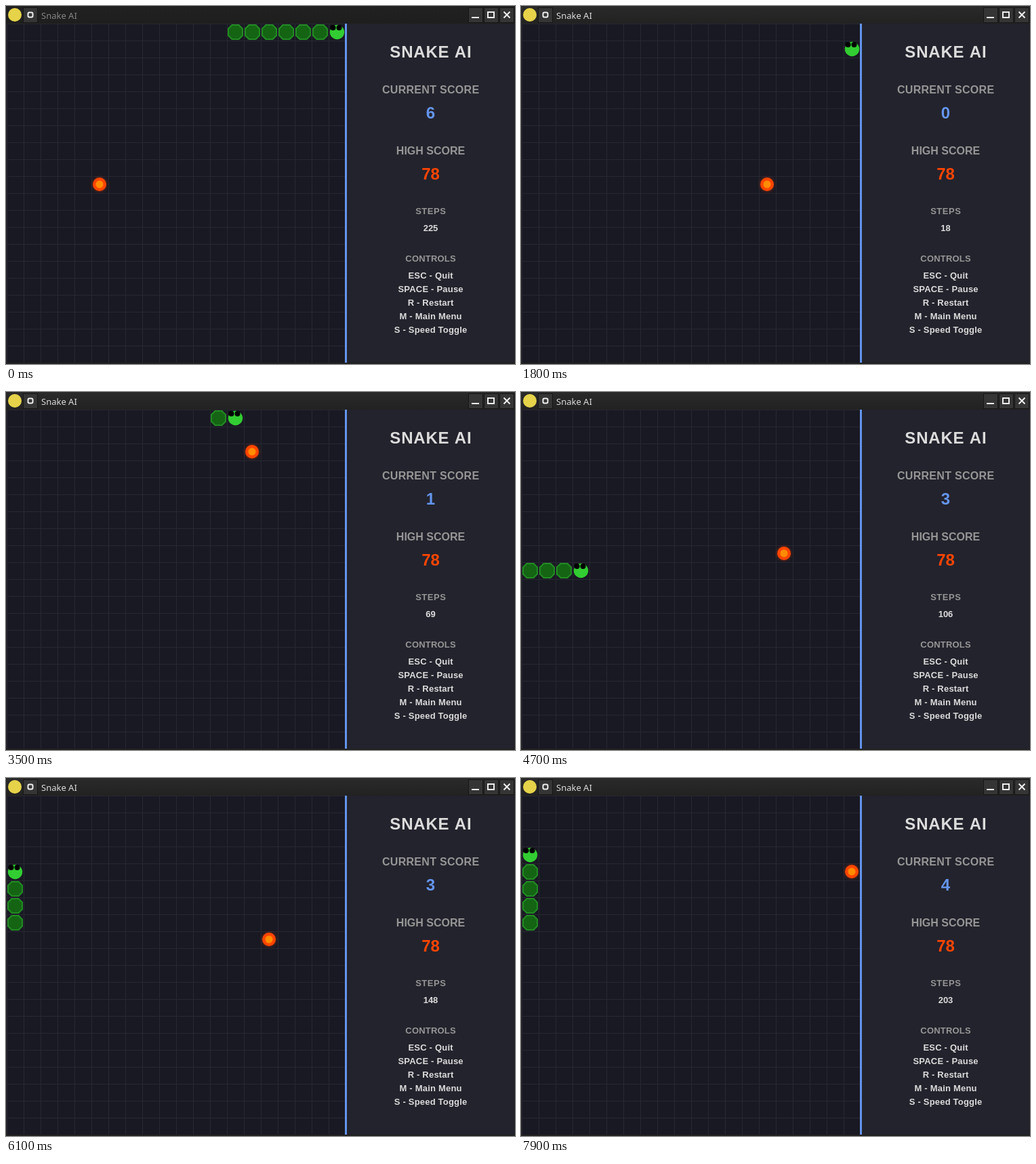
An HTML page with a canvas for the animation above (8 s loop, 751 by 528 pixels).

```html
<!DOCTYPE html>
<html>
<head>
<meta charset="utf-8">
<title>Snake AI</title>
<style>
html, body { margin: 0; width: 100%; height: 100%; overflow: hidden; background: #191923; }
canvas { display: block; }
</style>
</head>
<body>
<canvas id="stage" width="751" height="528"></canvas>
<script>
const g = document.getElementById('stage').getContext('2d');
const CELL = 25, LEFT = 1, TOP = 26, LAST = 19;
const LIGHT = '#dcdcdc', GREY = '#969696', BLUE = '#6495ed', ORANGE = '#ff4500';

// The snake circles clockwise: right along the top row, down the right wall,
// back left along another row, where it may change rows once at column `turn`.
// Returns the state of the game after every step.
function play(x, y, score, foods, laps) {
  const trail = [], states = [];
  let eaten = 0;
  function visit() {
    trail.push([x, y]);
    const [fx, fy] = foods[eaten];
    if (x === fx && y === fy) {
      score++;
      eaten++;
    }
    states.push({ score, food: foods[eaten], snake: trail.slice(-score - 1) });
  }
  function toColumn(end) {
    while (x !== end) { x += Math.sign(end - x); visit(); }
  }
  function toRow(end) {
    while (y !== end) { y += Math.sign(end - y); visit(); }
  }
  visit();
  for (const { top = 0, row, turn = 0, exit = row } of laps) {
    toRow(top);
    toColumn(LAST);
    toRow(row);
    toColumn(turn);
    toRow(exit);
    toColumn(0);
  }
  toRow(0);
  return states;
}

const oldGame = play(13, 0, 6, [[5, 9], [12, 5]], [{ row: 9 }]);
const newGame = play(10, 10, 0, [[14, 9], [14, 2], [3, 9], [15, 8], [19, 4]], [
  { top: 1, row: 10, turn: 14, exit: 9 },
  { row: 2, turn: 10, exit: 8 },
  { top: 9, row: 10 },
  { row: 8 }
]);

function rect(color, x, y, w, h) {
  g.fillStyle = color;
  g.fillRect(x, y, w, h);
}

function disc(color, x, y, r) {
  g.fillStyle = color;
  g.beginPath();
  g.arc(x, y, r, 0, 2 * Math.PI);
  g.fill();
}

// Square with its corners cut off; r is half the width.
function octagon(color, x, y, r, cut) {
  g.fillStyle = color;
  g.beginPath();
  for (let i = 0; i < 8; i++) {
    const a = (i + 0.5) * Math.PI / 4;
    const side = v => Math.sign(v) * (Math.abs(v) > 0.5 ? r : r - cut);
    g.lineTo(x + side(Math.cos(a)), y + side(Math.sin(a)));
  }
  g.fill();
}

function label(text, y, size, color, spacing = 0) {
  g.font = `bold ${size}px "Liberation Sans", Arial, sans-serif`;
  g.letterSpacing = spacing + 'px';
  g.textAlign = 'center';
  g.fillStyle = color;
  g.fillText(text, 626.5 + spacing / 2, y);
  g.letterSpacing = '0px';
}

function button(x) {
  rect('#161616', x - 1, 2, 22, 23);
  rect('#353535', x, 3, 20, 21);
}

function titleBar(active) {
  const shade = g.createLinearGradient(0, 0, 0, TOP);
  shade.addColorStop(0, active ? '#2a2a2a' : '#212121');
  shade.addColorStop(1, active ? '#222' : '#1e1e1e');
  rect(shade, 0, 0, 751, TOP);
  disc('#e6d34a', 13, 13, 10);
  [26, 683, 706, 729].forEach(button);

  g.strokeStyle = '#eee';
  g.lineWidth = 2;
  g.beginPath();
  g.roundRect(32.5, 9.5, 7, 7, 2);
  g.stroke();
  rect('#eee', 687, 16, 11, 2);
  g.strokeRect(711, 9, 9, 8);
  g.beginPath();
  g.moveTo(734.5, 8.5); g.lineTo(743.5, 17.5);
  g.moveTo(743.5, 8.5); g.lineTo(734.5, 17.5);
  g.stroke();

  g.font = '13px "Noto Sans", sans-serif';
  g.textAlign = 'left';
  g.fillStyle = active ? LIGHT : '#858585';
  g.fillText('Snake AI', 52, 19);
}

function board() {
  rect('#191923', LEFT, TOP, 500, 500);
  for (let i = 0; i < 500; i += CELL) {
    rect('#282832', LEFT + i, TOP, 1, 500);
    rect('#282832', LEFT, TOP + i, 500, 1);
  }
}

const center = ([x, y]) => [LEFT + (x + 0.5) * CELL, TOP + (y + 0.5) * CELL];

function drawFood(cell) {
  const [x, y] = center(cell).map(Math.floor);
  disc('rgba(255,69,0,.06)', x, y, 13);
  disc('rgba(255,69,0,.1)', x, y, 11.5);
  disc(ORANGE, x, y, 10);
  disc('#ff8c00', x, y, 5.5);
}

function drawSnake(cells) {
  const [head, ...body] = cells.map(center).reverse();
  for (const [x, y] of body) {
    octagon('#228b22', x, y, 11.5, 6);
    octagon('#146414', x, y, 9.5, 5);
  }
  const [x, y] = head;
  disc('#32cd32', x, y, 10.7);
  disc('#000', x - 6, y - 6.5, 4);
  disc('#000', x + 3, y - 6.5, 4);
}

function panel(score, steps) {
  rect('#23232d', 501, TOP, 249, 500);
  rect(BLUE, 500, TOP, 3, 500);
  label('SNAKE AI', 76, 24, LIGHT, 0.8);
  label('CURRENT SCORE', 129, 16, GREY, 0.3);
  label(score, 166, 24, BLUE);
  label('HIGH SCORE', 219, 16, GREY);
  label('78', 256, 24, ORANGE);
  label('STEPS', 307, 13, GREY, 0.5);
  label(steps, 332, 13, LIGHT);
  label('CONTROLS', 377, 13, GREY, 0.2);
  ['ESC - Quit', 'SPACE - Pause', 'R - Restart', 'M - Main Menu', 'S - Speed Toggle']
    .forEach((text, i) => label(text, 402 + 20 * i, 13, LIGHT, 0.2));
}

const start = performance.now();

function draw() {
  const t = Math.floor((performance.now() - start) % 8000 / 100) * 100;
  const restarted = t >= 1200;
  const steps = Math.floor(restarted ? 0.02 + (t - 1200) * 0.0303 : 225 + t * 0.0303);
  const { score, food, snake } = restarted ? newGame[steps] : oldGame[steps - 219];

  rect('#212121', 0, 0, 751, 528);
  board();
  drawFood(food);
  drawSnake(snake);
  panel(score, steps);
  titleBar(t >= 1100);
  requestAnimationFrame(draw);
}

draw();
</script>
</body>
</html>
```
